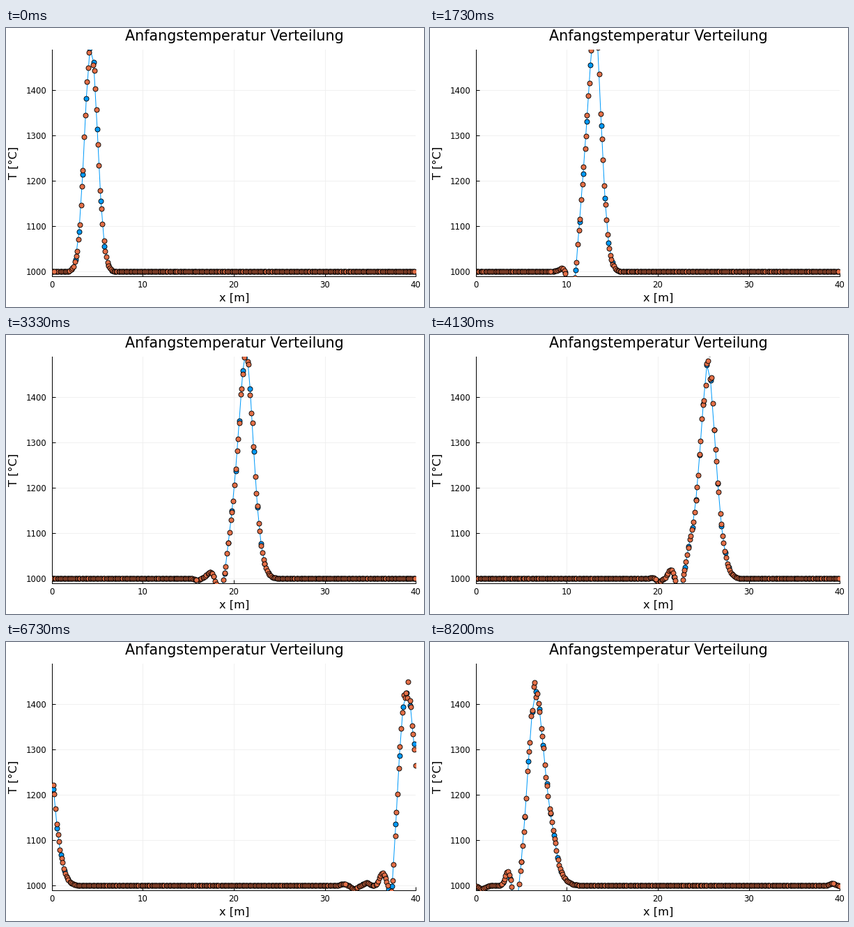
A matplotlib script that plays this animation: 600x400 px, repeating every 8270 ms.

```python
import numpy as np
import matplotlib.pyplot as plt
from matplotlib.animation import FuncAnimation

W, H, DPI = 600, 400, 100
FRAMES, LOOP_MS = 124, 8270
PT = 72 / DPI  # points per pixel
LENGTH, BASE = 40.0, 1000.0
BLUE, ORANGE = "#009AFA", "#E36F47"
LEFT, RIGHT, TOP, BOTTOM = 65.6, 588.2, 30.7, 355.8

# Steps between which the wave changes its shape.
KEYS = [0, 26, 37, 62, 81, 101, 123]

# Crest per key: height, offset, (width, power) behind and ahead.
CRESTS = [
    (500, 0.0, 1.00, 2.00, 1.00, 2.00),
    (565, 0.1, 1.36, 1.53, 0.98, 1.80),
    (550, 0.0, 1.38, 1.50, 1.10, 1.80),
    (475, 0.0, 1.27, 1.60, 1.25, 1.75),
    (420, 0.0, 1.12, 2.80, 1.43, 2.00),
    (425, 0.1, 1.28, 2.85, 1.33, 1.75),
    (428, 0.0, 1.24, 2.18, 1.50, 1.60),
]

# Trailing ripples per key: offset, height and, if unusual, width.
RIPPLES = [
    [],
    [(-2.35, -105, 0.65), (-3.3, 7)],
    [(-2.55, -95, 0.65), (-3.45, 22)],
    [(-2, 22), (-3.15, -38), (-4.05, 20), (-5.4, -7), (-6, 3)],
    [(-2.05, 60, 0.65), (-3.4, -11), (-4.35, 12), (-5.45, -8), (-6.3, 3)],
    [(-1.7, -48, 0.35), (-2.7, 28), (-4.45, 6), (-5.8, -7), (-7, 4.5)],
    [(1.9, 20), (-2.25, -62), (-3.1, 34), (-6, -7), (-7.5, 5)],
]

rng = np.random.default_rng(4)
COUNT = 300
cells = 0.2 + 0.4 * np.arange(100)
tracers = (np.arange(COUNT) + 0.5) * LENGTH / COUNT + rng.uniform(-0.035, 0.035, COUNT)


def ripple(u, pos, height, width=0.45):
    return height * np.exp(-((u - pos) / width) ** 2)


def wave(u, k):
    height, mid, w_back, p_back, w_front, p_front = CRESTS[k]
    d = u - mid
    width = np.where(d < 0, w_back, w_front)
    power = np.where(d < 0, p_back, p_front)
    crest = height * np.exp(-(np.abs(d) / width) ** power)
    return crest + sum(ripple(u, *r) for r in RIPPLES[k])


def excess(x, n):
    u = (x - 4.32 - 0.347 * n + 12) % LENGTH - 12
    k = min(np.searchsorted(KEYS, n, side="right") - 1, len(KEYS) - 2)
    mix = (n - KEYS[k]) / (KEYS[k + 1] - KEYS[k])
    return (1 - mix) * wave(u, k) + mix * wave(u, k + 1)


plt.rcParams["font.family"] = "DejaVu Sans"
fig = plt.figure(figsize=(W / DPI, H / DPI), dpi=DPI, facecolor="white")
ax = fig.add_axes([LEFT / W, 1 - BOTTOM / H, (RIGHT - LEFT) / W, (BOTTOM - TOP) / H])
ax.set(xlim=(0, LENGTH), ylim=(990, 1490),
       xticks=range(0, 41, 10), yticks=range(1000, 1401, 100))
ax.set_axisbelow(True)
ax.grid(color="#efefef", linewidth=0.9 * PT)
ax.tick_params(direction="in", length=5 * PT, width=PT, labelbottom=False, labelleft=False)
for side in ("top", "right"):
    ax.spines[side].set_visible(False)
for side in ("left", "bottom"):
    ax.spines[side].set(linewidth=PT, zorder=1)


def label(x, y, text, px, ha="center", va="baseline", **kw):
    fig.text(x / W, 1 - y / H, text, fontsize=px * PT, ha=ha, va=va, **kw)


label(327.5, 18.5, "Anfangstemperatur Verteilung", 20.6)
label(327.5, 392, "x [m]", 16.2)
label(11, 193, "T [°C]", 16.2, va="center", rotation=90)
for v in range(0, 41, 10):
    label(LEFT + v / LENGTH * (RIGHT - LEFT), 372, str(v), 11.8)
for v in range(1000, 1401, 100):
    y = BOTTOM - (v - 990) / 500 * (BOTTOM - TOP)
    label(58.5, y + 4.5, str(v), 11.8, ha="right")

dot = dict(marker="o", markersize=7 * PT, markeredgecolor="black", markeredgewidth=0.9 * PT)
grid_line, = ax.plot([], [], color=BLUE, linewidth=PT, markerfacecolor=BLUE, zorder=3, **dot)
tracer_dots, = ax.plot([], [], linestyle="none", markerfacecolor=ORANGE, zorder=4, **dot)


def update(n):
    grid_line.set_data(cells, BASE + excess(cells, n))
    x = (tracers + 0.32 * (n + 1)) % LENGTH
    e = excess(x, n)
    # scatter grows towards the crest
    spread = 0.008 * np.abs(e) + 9 * np.clip(e / 420, 0, 1.1) ** 6
    noise = np.random.default_rng(100 + n).normal(size=COUNT).clip(-1.5, 2.2)
    tracer_dots.set_data(x, BASE + e + spread * noise)
    return grid_line, tracer_dots


anim = FuncAnimation(fig, update, frames=FRAMES, interval=LOOP_MS / FRAMES,
                     repeat=True, repeat_delay=0, blit=False)
plt.show()
```
